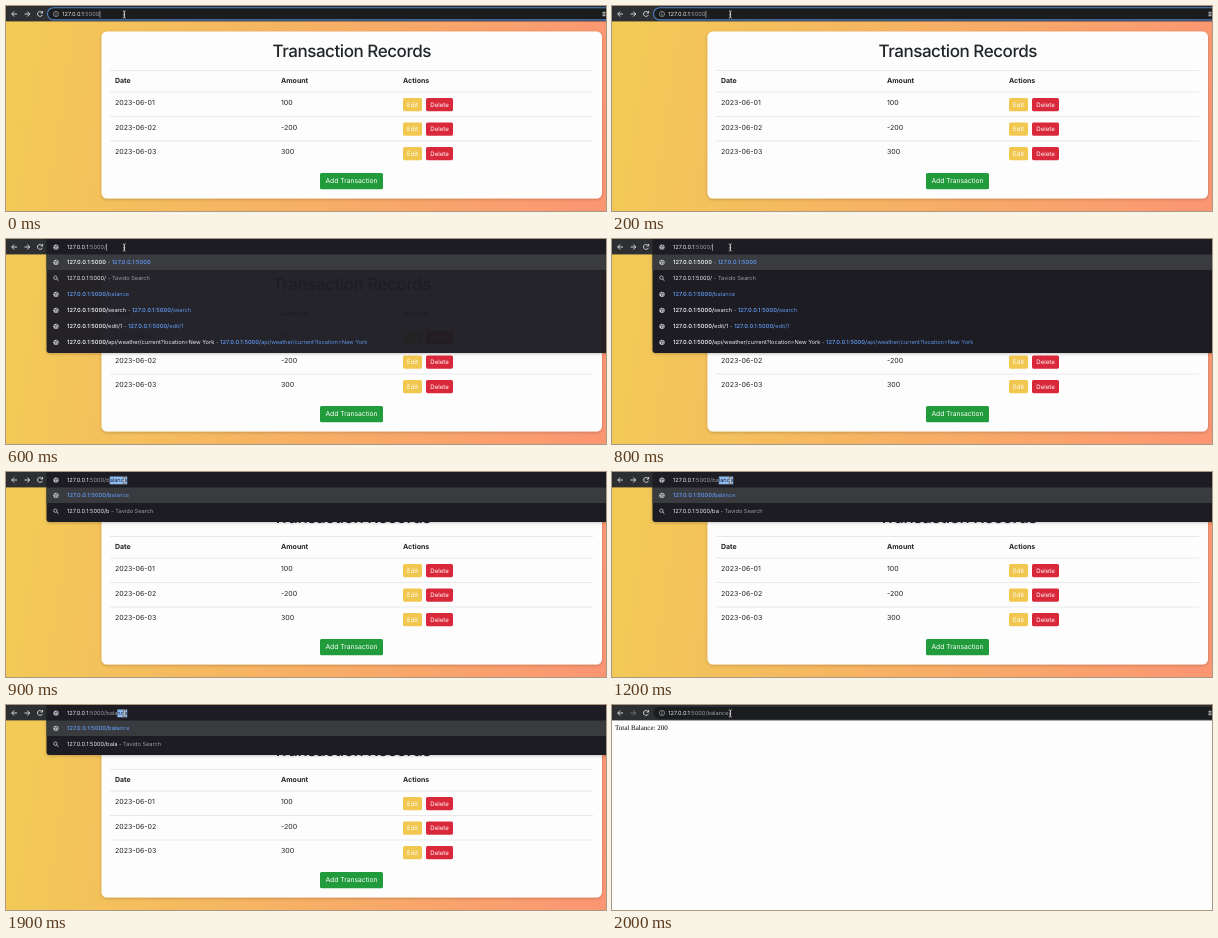
These frames come from a looping animation (600x205 px, 3 s). An HTML page:

```html
<!DOCTYPE html>
<html lang="en">
<head>
<meta charset="utf-8">
<title>Transaction Records</title>
<style>
  html, body { margin: 0; width: 100%; height: 100%; overflow: hidden; background: #fdfdfd; }
  svg { display: block; width: 600px; height: 205px; }
  text { font-family: Inter, Roboto, sans-serif; font-size: 7px; fill: #212529; text-rendering: geometricPrecision; white-space: pre; }
  .title { font-size: 17px; font-weight: 500; letter-spacing: -.45px; }
  .bold { font-weight: 700; }
  .button { font-size: 6.1px; fill: #fff; text-anchor: middle; }
  .add { font-size: 6.75px; }
  .plain { font-family: "Liberation Serif", "Times New Roman", serif; fill: #000; }
  .bar { font-size: 5.65px; fill: #e8eaed; }
  .strong { font-weight: 600; }
  .link { fill: #5f93e6; }
  .dim { fill: #9a9da2; }
  .selected { fill: #1c2c44; }
  .icon { fill: none; stroke: #dfe1e5; stroke-width: .9; }
  .faint { stroke: #77797d; }
  .rule { stroke: #dde0e3; stroke-width: .7; }
</style>
</head>
<body>
<svg id="stage" viewBox="0 0 600 205">
  <defs>
    <linearGradient id="warm" gradientUnits="userSpaceOnUse" x1="0" y1="60" x2="600" y2="150">
      <stop stop-color="#f2cb56"/><stop offset="1" stop-color="#fb9673"/>
    </linearGradient>
    <filter id="shadow" x="-5%" y="-10%" width="110%" height="125%">
      <feDropShadow dx="0" dy="1" stdDeviation="1.8" flood-opacity=".22"/>
    </filter>
  </defs>
  <g id="page"></g>
  <g id="chrome"></g>
</svg>
<script>
const LOOP = 3000, HOST = '127.0.0.1', ROOT = HOST + ':5000', ENGINE = 'Tavido Search';
const page = document.getElementById('page');
const chrome = document.getElementById('chrome');

const text = (x, y, content, cls = '') => `<text x="${x}" y="${y}" class="${cls}">${content}</text>`;
const rect = (x, y, w, h, fill, extra = '') =>
  `<rect x="${x}" y="${y}" width="${w}" height="${h}" fill="${fill}" ${extra}/>`;
const span = (cls, content) => `<tspan class="${cls}">${content}</tspan>`;
const path = (d, cls = '') => `<path class="icon ${cls}" d="${d}"/>`;
const rule = y => `<path class="rule" d="M104 ${y}H587"/>`;

function button(x, y, w, h, color, label, cls = '') {
  return rect(x, y, w, h, color, 'rx="1.6"') + text(x + w / 2, y + h / 2 + 2.2, label, 'button ' + cls);
}

function recordsPage() {
  const columns = [109, 275, 397];
  const records = [['2023-06-01', '100'], ['2023-06-02', '-200'], ['2023-06-03', '300']];
  const headings = ['Date', 'Amount', 'Actions'].map((h, i) => text(columns[i], 77.3, h, 'bold'));
  const rows = records.map(([date, amount], i) => {
    const y = 92 + i * 24.5;
    return text(columns[0], y + 7.4, date) + text(columns[1], y + 7.4, amount) +
      button(397, y, 19, 13.2, '#f1c750', 'Edit') +
      button(420, y, 27, 13.2, '#d9283a', 'Delete') +
      (i < 2 ? rule(y + 18.5) : '');
  });
  return rect(0, 15, 600, 190, 'url(#warm)') +
    rect(95.5, 25.5, 500.5, 167, '#fdfdfd', 'rx="5.5" filter="url(#shadow)"') +
    text(266.5, 51, 'Transaction Records', 'title') +
    rule(64.5) + rule(86) + headings.join('') + rows.join('') +
    button(314, 167, 63, 16.3, '#229b3c', 'Add Transaction', 'add');
}

const balancePage = () => rect(0, 15, 600, 190, '#fdfdfd') + text(3, 25.3, 'Total Balance: 200', 'plain');

const globe = y => `<circle cx="50" cy="${y}" r="2.6" fill="#c6c9cd"/>` +
  `<path d="M48 ${y - 1}l1.7 .5 .2 1.5-1 .8M50.5 ${y - 2}l-.2 1.2 1.7 .6M51.7 ${y + .8}l-1 1.1" fill="none" stroke="#333539" stroke-width=".7"/>`;
const magnifier = y => `<circle class="icon" cx="49.4" cy="${y - .6}" r="1.7" style="stroke-width:.7"/>` +
  path(`M50.7 ${y + .7}l1.7 1.7`);
const info = `<circle class="icon" cx="50" cy="8" r="2.6" style="stroke-width:.6;stroke:#b5b8bc"/>` +
  `<path class="icon" d="M50 7.6v1.9M50 6.4v.6" style="stroke-width:.6"/>`;

function toolbar(forwardFaint) {
  return rect(0, 0, 600, 15.4, '#2e2f32') +
    path('M11 8H5.8M8.2 5.5L5.7 8l2.5 2.5') +
    path('M18.5 8h5.2M21.3 5.5L23.8 8l-2.5 2.5', forwardFaint ? 'faint' : '') +
    path('M36.2 6.6A2.5 2.5 0 1 0 36.4 8.8M36.6 5v2h-2');
}

// A suggestion with no link part is a bare address; a search row is not bold.
function suggestions(typed) {
  const bold = rest => span('strong', ROOT + '/') + rest;
  const pair = rest => bold(rest) + span('dim', ' - ') + span('link', bold(rest));
  const address = (head, tail) => span('link', span('strong link', head) + span('link', tail));
  const search = ROOT + '/' + typed + span('dim', ' - ' + ENGINE);
  if (typed) return [address(ROOT + '/' + typed, 'balance'.slice(typed.length)), search];
  return [
    span('strong', ROOT) + span('dim', ' - ') + span('strong link', ROOT),
    search,
    address(ROOT + '/', 'balance'),
    ...['search', 'edit/1', 'api/weather/current?location=New York'].map(pair)
  ];
}

function dropdown(typed, opacity) {
  const rows = suggestions(typed);
  const height = rows.length * 16 + 18;
  const list = rows.map((row, i) => {
    const y = 23.3 + i * 16;
    return (i === 1 ? magnifier(y) : globe(y)) + text(61, y + 2, row, 'bar');
  });
  return rect(40.5, -6, 570, height + 6, '#1d1e20', `rx="3" opacity="${opacity}" filter="url(#shadow)"`) +
    rect(40.5, 15.5, 560, 15.5, '#393b3f') + globe(8) + list.join('');
}

const pointer = `<path d="M116.8 4.8q1.5 0 1.5 1v5.3q0 1-1.5 1M119.8 4.8q-1.5 0-1.5 1v5.3q0 1 1.5 1M117.4 8.8h1.8" fill="none" stroke="#111" stroke-width="1.5"/>` +
  `<path d="M116.8 4.8q1.5 0 1.5 1v5.3q0 1-1.5 1M119.8 4.8q-1.5 0-1.5 1v5.3q0 1 1.5 1M117.4 8.8h1.8" fill="none" stroke="#e4e4e4" stroke-width=".7"/>`;

function stateAt(t) {
  if (t >= 2000) return { view: 'balance', rest: ':5000/balance' };
  if (t < 600) return { view: 'records', rest: ':5000', caret: t < 300 };
  const typed = t < 900 ? '' : 'balance'.slice(0, Math.min(4, 1 + Math.floor((t - 900) / 200)));
  return {
    view: 'typing', typed, rest: ':5000/' + typed,
    completion: typed && 'balance'.slice(typed.length),
    caret: !typed, opacity: t < 700 ? .96 : 1
  };
}

function draw({ view, typed, rest, completion = '', caret, opacity }) {
  const typing = view === 'typing';
  page.innerHTML = view === 'balance' ? balancePage() : recordsPage();
  const field = typing ? dropdown(typed, opacity)
    : rect(41.5, 1.7, 570, 12.2, '#1b1c1e', `rx="6.1" ${view === 'records' ? 'stroke="#4d80c4" stroke-width="1.1"' : ''}`) +
      info + path('M596.5 6.3h3M596.5 8h3M596.5 9.7h3');
  const url = HOST + span('dim', rest) + span('selected', completion);
  chrome.innerHTML = toolbar(view === 'balance') + field + '<g id="mark"></g>' +
    `<text id="url" class="bar" x="${typing ? 61 : 56.3}" y="10.2">${url}</text>` + pointer;

  const label = document.getElementById('url');
  const start = label.getEndPositionOfChar(HOST.length + rest.length - 1).x;
  const end = label.getEndPositionOfChar(label.getNumberOfChars() - 1).x;
  document.getElementById('mark').innerHTML =
    completion ? rect(start, 4.5, end - start, 7.8, '#8fb9ee') :
    caret ? rect(start + .2, 4.8, .6, 7, '#d5d7da') : '';
}

let shown = '';
function tick() {
  const state = stateAt(performance.now() % LOOP);
  const key = JSON.stringify(state);
  if (key !== shown) {
    shown = key;
    draw(state);
  }
  requestAnimationFrame(tick);
}
tick();
</script>
</body>
</html>
```
